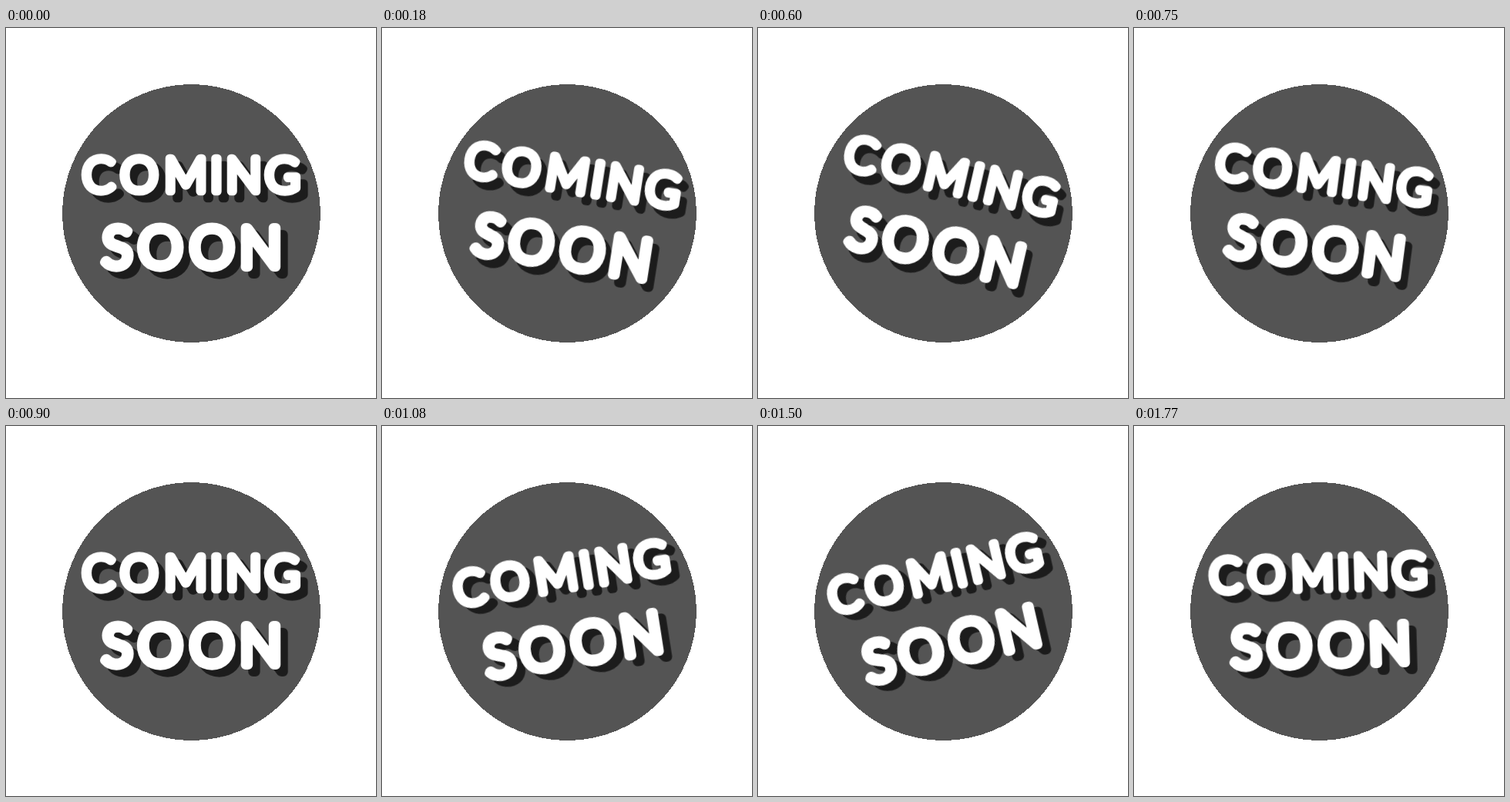
Animation, 480 px wide and 480 px high, one loop 1.8 s. Source, as an HTML page without scripts:

```html
<!DOCTYPE html>
<html lang="en">
<head>
<meta charset="utf-8">
<title>Coming soon</title>
<style>
  html, body { margin: 0; width: 100%; height: 100%; overflow: hidden; background: #fff; }
  svg { display: block; width: 100vw; height: 100vh; }
  text {
    font-family: Lato, "Open Sans", sans-serif;
    font-weight: 300;
    text-anchor: middle;
    text-rendering: geometricPrecision;
    fill: currentColor;
    stroke: currentColor;
    stroke-linejoin: round;
    stroke-linecap: round;
  }
  .top { font-size: 60.8px; stroke-width: 10.3px; }
  .low { font-size: 72px; stroke-width: 12.2px; }
  .face { color: #fff; }
  .shade { color: #1c1c1c; filter: blur(.7px); }

  /* half a sine wave per pass, entered at its midpoint */
  .sway {
    transform-origin: 240px 240px;
    animation: sway 900ms cubic-bezier(.364, 0, .636, 1) -450ms infinite alternate;
  }
  @keyframes sway {
    from { transform: rotate(-15deg); }
    to { transform: rotate(15deg); }
  }
</style>
</head>
<body>
<svg viewBox="0 0 480 480">
  <defs>
    <g id="words">
      <text class="top" x="119.7 172.8 233 273 308.5 358.7" y="211.7">COMING</text>
      <text class="low" x="144.3 200.3 267.3 330.5" y="309.8">SOON</text>
    </g>
  </defs>
  <circle cx="240.5" cy="240.5" r="167.5" fill="#545454" shape-rendering="crispEdges"/>
  <g class="sway">
    <g class="shade"><use href="#words" x="9.5" y="9.5"/></g>
    <use class="face" href="#words"/>
  </g>
</svg>
</body>
</html>
```
